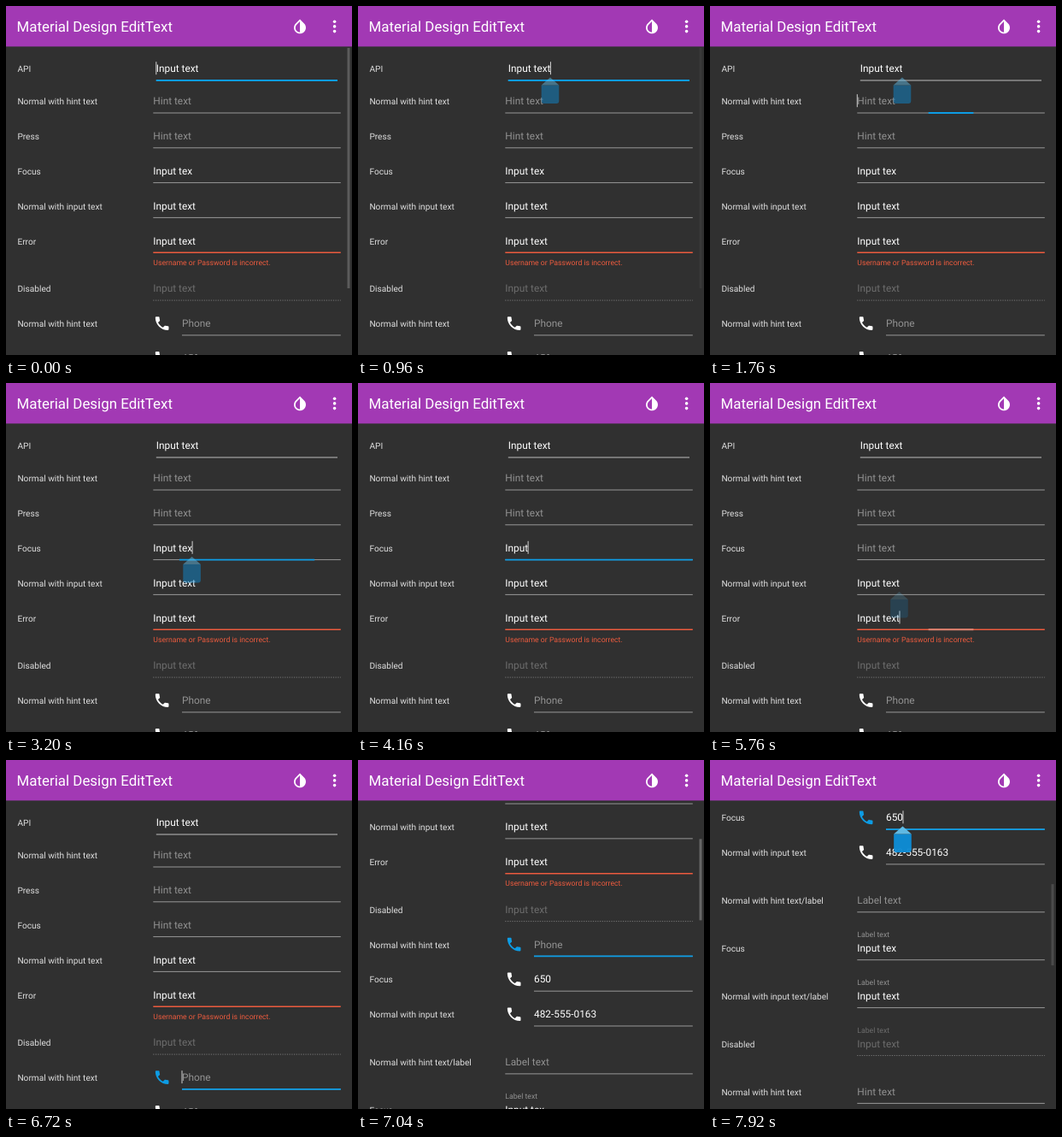
An HTML page that plays this animation: 405 px wide and 408 px high, repeating every 8 s.

```html
<!DOCTYPE html>
<html lang="en">
<head>
<meta charset="utf-8">
<title>Material Design EditText</title>
<style>
html, body { margin: 0; width: 100%; height: 100%; overflow: hidden; background: #303030; }
svg { display: block; width: 405px; height: 408px; font-family: Roboto, "Noto Sans", sans-serif; text-rendering: geometricPrecision; }
text { white-space: pre; }
.caption { font-size: 10.15px; fill: #dedede; }
.value { font-size: 11.85px; }
.small { font-size: 8.7px; }
</style>
</head>
<body>
<svg id="stage" viewBox="0 0 405 408">
  <rect width="405" height="408" fill="#303030"/>
  <g id="list"></g>
  <rect id="scrollbar" x="399.5" width="3" fill="#787878"/>
  <rect width="405" height="47.4" fill="#a239b4"/>
  <text x="12.6" y="30" font-size="16.9" fill="#fff">Material Design EditText</text>
  <path transform="translate(333.6 13.6) scale(.87)" fill="#fff" d="M17.66 7.93L12 2.27 6.34 7.93c-3.12 3.12-3.12 8.19 0 11.31C7.9 20.8 9.95 21.58 12 21.58s4.1-.78 5.66-2.34c3.12-3.12 3.12-8.19 0-11.31zM12 19.59c-1.6 0-3.11-.62-4.24-1.76S6 15.19 6 13.59s.62-3.11 1.76-4.24L12 5.1z"/>
  <g fill="#fff"><circle cx="384.6" cy="18.2" r="1.8"/><circle cx="384.6" cy="23.9" r="1.8"/><circle cx="384.6" cy="29.6" r="1.8"/></g>
</svg>
<script>
const LOOP = 8000, TICK = 80, LINE_TIME = 333, FADE = 240, BLINK = 570;
const BLUE = '#0d9ce4', RED = '#ec5b3e', GREY = '#979797', HINT = '#929292', DIM = '#6d6d6d';
const PHONE = 'M6.62 10.79c1.44 2.83 3.76 5.14 6.59 6.59l2.2-2.2c.27-.27.67-.36 1.02-.24 1.12.37 2.33.57 3.57.57.55 0 1 .45 1 1V20c0 .55-.45 1-1 1-9.39 0-17-7.61-17-17 0-.55.45-1 1-1h3.5c.55 0 1 .45 1 1 0 1.25.2 2.45.57 3.57.11.35.03.74-.25 1.02z';
const ROW = 40.8, TALL_ROW = 55.9, FIRST_LINE = 87;

const rows = [
  { label: 'API', text: 'Input text', x: 175.8, right: 388, line: '#bdbdbd' },
  { label: 'Normal with hint text', hint: 'Hint text', gap: 38 },
  { label: 'Press', hint: 'Hint text' },
  { label: 'Focus', text: 'Input tex', hint: 'Hint text' },
  { label: 'Normal with input text', text: 'Input text' },
  { label: 'Error', text: 'Input text', error: 'Username or Password is incorrect.' },
  { label: 'Disabled', text: 'Input text', disabled: true, gap: TALL_ROW },
  { label: 'Normal with hint text', hint: 'Phone', phone: true },
  { label: 'Focus', text: '650', phone: true },
  { label: 'Normal with input text', text: '482-555-0163', phone: true },
  { label: 'Normal with hint text/label', hint: 'Label text', gap: TALL_ROW },
  { label: 'Focus', text: 'Input tex', floating: 'Label text', gap: TALL_ROW },
  { label: 'Normal with input text/label', text: 'Input text', floating: 'Label text', gap: TALL_ROW },
  { label: 'Disabled', text: 'Input text', floating: 'Label text', disabled: true, gap: TALL_ROW },
  { label: 'Normal with hint text', hint: 'Hint text', gap: TALL_ROW },
];

// show/hide are the start times of the caret handle's fades
const visits = [
  { row: 0, from: -400, to: 1680, tap: 800, show: 840, hide: 1640 },
  { row: 1, from: 1680, to: 2320 },
  { row: 2, from: 2320, to: 2960 },
  { row: 3, from: 2960, to: 5040, show: 3080, hide: 3760 },
  { row: 4, from: 5040, to: 5680, show: 5160, hide: 5570 },
  { row: 5, from: 5680, to: 6320, show: 5840, hide: 6240 },
  { row: 7, from: 6320, to: 7420 },
  { row: 8, from: 7420, to: 9000, show: 7480, hide: 9000 },
];
const erase = { row: 3, first: 3840, step: 100 };
const scroll = { from: 6900, to: 7440, distance: 344.6 };

const list = document.getElementById('list');
const scrollbar = document.getElementById('scrollbar');
const clamp = v => Math.max(0, Math.min(1, v));
const progress = (t, start, time) => clamp((t - start) / time);

function set(el, attrs) {
  for (const key in attrs) el.setAttribute(key, attrs[key]);
  return el;
}
function add(tag, attrs, content, parent = list) {
  const el = set(document.createElementNS('http://www.w3.org/2000/svg', tag), attrs);
  if (content) el.textContent = content;
  return parent.appendChild(el);
}

rows.forEach((row, i) => {
  row.y = i ? rows[i - 1].y + (row.gap ?? ROW) : FIRST_LINE;
  row.x ??= row.phone ? 206 : 172.3;
  row.right ??= 391.8;
  const { x, y, right } = row, base = y - 9.7;
  add('text', { x: 13.4, y: base, class: 'caption' }, row.label);
  if (row.phone) {
    row.icon = add('path', { d: PHONE, transform: `translate(172.2 ${y - 24.2}) scale(.87)` });
  }
  if (row.floating) {
    add('text', { x, y: base - 17, class: 'small', fill: row.disabled ? DIM : HINT }, row.floating);
  }
  row.value = add('text', { x, y: base, class: 'value' });
  add('line', { x1: x, x2: right, y1: y, y2: y, 'stroke-width': row.error ? 1.6 : 1,
    stroke: row.error ? RED : row.disabled ? '#777' : row.line || GREY,
    'stroke-dasharray': row.disabled ? '1.2 1.5' : 'none' });
  row.accent = add('line', { y1: y, y2: y, 'stroke-width': 1.9, stroke: row.error ? '#df8471' : BLUE });
  if (row.error) add('text', { x, y: y + 14.8, class: 'small', fill: RED }, row.error);
});

const caret = add('rect', { width: 1, height: 15, fill: '#d0d0d0' });
for (const visit of visits.filter(v => v.show)) {
  visit.handle = add('g');
  add('path', { d: 'M-10.3 9H10.3V27.5q0 3-3 3H-7.3q-3 0-3-3z', fill: '#0e8dd6' }, '', visit.handle);
  add('path', { d: 'M0 0L10.3 9H-10.3z', fill: '#62bfea' }, '', visit.handle);
}

function erasedCount(t) {
  return Math.max(0, Math.min(9, Math.floor((t - erase.first) / erase.step) + 1));
}

function render(t) {
  const shift = scroll.distance * (1 - (1 - progress(t, scroll.from, scroll.to - scroll.from)) ** 2);
  set(list, { transform: `translate(0 ${-shift})` });

  const active = visits.find(v => t >= v.from && t < v.to);
  const erased = erasedCount(t);

  rows.forEach((row, i) => {
    const full = row.text || '';
    const text = i === erase.row ? full.slice(0, full.length - erased) : full;
    const content = text || row.hint;
    if (row.value.textContent !== content) row.value.textContent = content;
    set(row.value, { fill: row.disabled ? DIM : text ? '#fff' : HINT });
    row.width = text ? row.value.getComputedTextLength() : 0;

    const focused = active.row === i;
    const grown = focused ? progress(t, active.from, LINE_TIME) : 0;
    const middle = (row.x + row.right) / 2, half = (row.right - row.x) / 2 * grown;
    set(row.accent, { x1: middle - half, x2: middle + half,
      visibility: grown && !(row.error && grown === 1) ? 'visible' : 'hidden' });
    if (row.icon) set(row.icon, { fill: focused ? BLUE : '#fff' });
  });

  const row = rows[active.row];
  let anchor = active.from, offset = row.width;
  if (active.tap) {
    if (t < active.tap) offset = 0;
    else anchor = active.tap;
  }
  if (active.row === erase.row && erased) anchor = erase.first + (erased - 1) * erase.step;
  set(caret, { x: row.x + offset - .5, y: row.y - 21.8,
    visibility: (t - anchor) % (2 * BLINK) < BLINK ? 'visible' : 'hidden' });

  for (const v of visits) {
    if (!v.handle) continue;
    const alpha = progress(t, v.show, FADE) * (1 - progress(t, v.hide, FADE));
    const { x, y, width } = rows[v.row];
    set(v.handle, { opacity: alpha * .96, visibility: alpha ? 'visible' : 'hidden' });
    if (alpha && !(v.row === erase.row && erased)) {
      set(v.handle, { transform: `translate(${x + width - .5} ${y - 3.5})` });
    }
  }

  const scrolling = t >= 6960;
  set(scrollbar, {
    y: scrolling ? 49 + shift * .279 : 49,
    height: scrolling ? 95 : 281,
    opacity: scrolling ? .75 * (1 - progress(t, 7720, 400)) : .6 * (1 - progress(t, 640, 400)),
  });
}

const start = performance.now();
function frame() {
  const t = (performance.now() - start) % LOOP;
  render(Math.floor(t / TICK) * TICK);
  requestAnimationFrame(frame);
}
frame();
</script>
</body>
</html>
```
